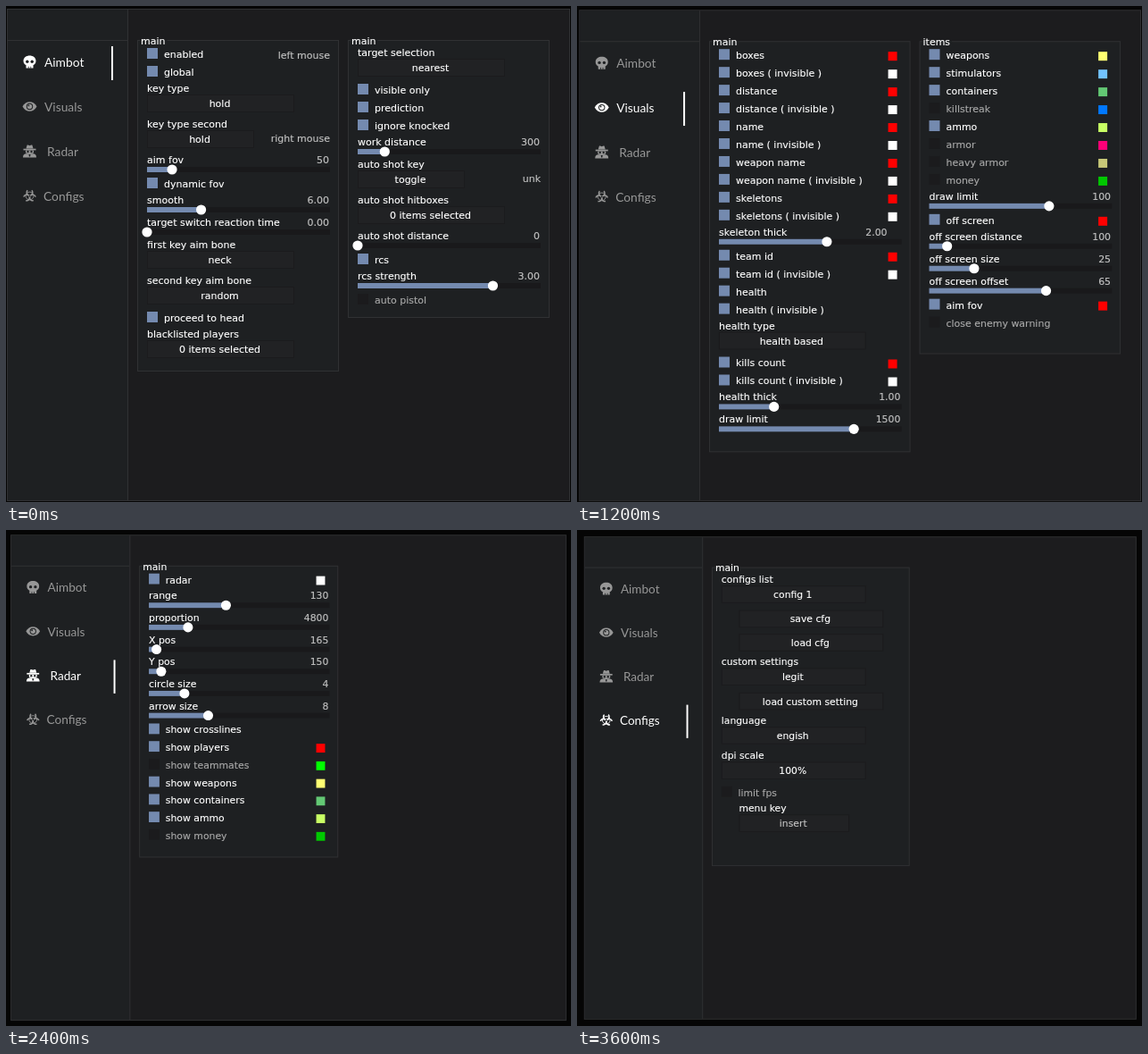
An HTML page with a canvas that plays this animation: 633x555 px, repeating every 4.8 s.

```html
<!DOCTYPE html>
<html lang="en">
<head>
<meta charset="utf-8">
<title>Menu tabs</title>
<style>
html, body { margin: 0; width: 100%; height: 100%; overflow: hidden; background: #000; }
canvas { display: block; }
</style>
</head>
<body>
<canvas id="stage" width="633" height="555"></canvas>
<script>
const ctx = document.getElementById('stage').getContext('2d');
const HOLD = 1200;
const FONT = '11px "DejaVu Sans", Verdana, sans-serif';
const TAB_FONT = '13.8px Lato, "Open Sans", sans-serif';
const C = {
  bg: '#1c1c1e', side: '#1e2022', line: '#303133', track: '#19191b',
  blue: '#748aaf', field: '#212224', edge: '#1b1b1d',
  text: '#fff', dim: '#a8a8a8', value: '#c2c2c2', tab: '#979797'
};
const RED = '#ff0000', WHITE = '#fff', YELLOW = '#ffff72', GREEN = '#63c874',
      LIME = '#c8ff64', MONEY = '#00c800';

// Row builders
const check = (label, swatch, on = true) => ({ type: 'check', label, swatch, on });
const off = (label, swatch) => check(label, swatch, false);
const slider = (label, value, part, right = 204) => ({ type: 'slider', label, value, part, right });
const combo = (label, value, opt = {}) => ({ type: 'combo', label, value, w: 165, indent: 0, ...opt });
const button = label => ({ type: 'button', label });
const keyed = (row, key) => ({ ...row, key });
const pair = (label, color = RED) => [check(label, color), check(label + ' ( invisible )', color && WHITE)];

const ADVANCE = { check: 20, slider: 25, combo: 40, button: 27 };

const pages = [
  {
    scale: 1, x: 0, y: 0,
    groups: [
      { title: 'main', x: 147, bottom: 408, rows: [
        keyed(check('enabled'), 'left mouse'),
        check('global'),
        combo('key type', 'hold'),
        keyed(combo('key type second', 'hold', { w: 120 }), 'right mouse'),
        slider('aim fov', '50', 50 / 360),
        check('dynamic fov'),
        slider('smooth', '6.00', 0.3),
        slider('target switch reaction time', '0.00', 0),
        combo('first key aim bone', 'neck'),
        combo('second key aim bone', 'random'),
        check('proceed to head'),
        combo('blacklisted players', '0 items selected')
      ] },
      { title: 'main', x: 383, bottom: 348, rows: [
        combo('target selection', 'nearest'),
        check('visible only'),
        check('prediction'),
        check('ignore knocked'),
        slider('work distance', '300', 0.15),
        keyed(combo('auto shot key', 'toggle', { w: 120 }), 'unk'),
        combo('auto shot hitboxes', '0 items selected'),
        slider('auto shot distance', '0', 0),
        check('rcs'),
        slider('rcs strength', '3.00', 0.75),
        off('auto pistol')
      ] }
    ]
  },
  {
    scale: 0.998, x: 1.3, y: 1.3,
    groups: [
      { title: 'main', x: 147, bottom: 498, rows: [
        ...['boxes', 'distance', 'name', 'weapon name', 'skeletons'].flatMap(s => pair(s)),
        slider('skeleton thick', '2.00', 0.6, 189),
        ...pair('team id'),
        ...pair('health', null),
        combo('health type', 'health based'),
        ...pair('kills count'),
        slider('health thick', '1.00', 0.306),
        slider('draw limit', '1500', 0.75)
      ] },
      { title: 'items', x: 383, bottom: 388, rows: [
        check('weapons', YELLOW),
        check('stimulators', '#72c3ff'),
        check('containers', GREEN),
        off('killstreak', '#0078ff'),
        check('ammo', LIME),
        off('armor', '#ff0078'),
        off('heavy armor', '#c8c878'),
        off('money', MONEY),
        slider('draw limit', '100', 2 / 3),
        check('off screen', RED),
        slider('off screen distance', '100', 0.1),
        slider('off screen size', '25', 0.25),
        slider('off screen offset', '65', 0.65),
        check('aim fov', RED),
        off('close enemy warning')
      ] }
    ]
  },
  {
    scale: 0.987, x: 4.1, y: 2.3,
    groups: [
      { title: 'main', x: 147, bottom: 368, rows: [
        check('radar', WHITE),
        slider('range', '130', 130 / 300),
        slider('proportion', '4800', 0.22),
        slider('X pos', '165', 165 / 3840),
        slider('Y pos', '150', 150 / 2160),
        slider('circle size', '4', 0.2),
        slider('arrow size', '8', 1 / 3),
        check('show crosslines'),
        check('show players', RED),
        off('show teammates', '#00ff00'),
        check('show weapons', YELLOW),
        check('show containers', GREEN),
        check('show ammo', LIME),
        off('show money', MONEY)
      ] }
    ]
  },
  {
    scale: 0.981, x: 6.8, y: 4.3,
    groups: [
      { title: 'main', x: 147, bottom: 378, rows: [
        combo('configs list', 'config 1'),
        button('save cfg'),
        button('load cfg'),
        combo('custom settings', 'legit'),
        button('load custom setting'),
        combo('language', 'engish'),
        combo('dpi scale', '100%'),
        off('limit fps'),
        combo('menu key', 'insert', { w: 126, indent: 20, color: C.value })
      ] }
    ]
  }
];

function rect(x, y, w, h, color) {
  ctx.fillStyle = color;
  ctx.fillRect(x, y, w, h);
}

// A hairline stroke gives the small type its firmer weight
function text(str, x, mid, color = C.text, align = 'left') {
  ctx.font = FONT;
  ctx.textAlign = align;
  ctx.fillStyle = ctx.strokeStyle = color;
  ctx.lineWidth = 0.15;
  ctx.fillText(str, x, mid + 4);
  ctx.strokeText(str, x, mid + 4);
}

function disc(x, y, r, color) {
  ctx.fillStyle = color;
  ctx.beginPath();
  ctx.arc(x, y, r, 0, Math.PI * 2);
  ctx.fill();
}

function shape(d, color) {
  ctx.fillStyle = color;
  ctx.fill(new Path2D(d));
}

function field(label, x, y, w, color) {
  rect(x, y, w, 20, C.edge);
  rect(x + 1, y + 1, w - 2, 18, C.field);
  text(label, x + w / 2 - 1, y + 10, color, 'center');
}

const draw = {
  check(r, x, y) {
    rect(x, y, 12, 12, r.on ? C.blue : C.edge);
    text(r.label, x + 19, y + 7, r.on ? C.text : C.dim);
    if (r.swatch) rect(x + 190, y + 3, 10, 10, r.swatch);
    if (r.key) text(r.key, x + 205, y + 8, C.value, 'right');
  },
  slider(r, x, y) {
    const len = r.part * 202;
    rect(x, y + 13, 205, 6, C.track);
    rect(x, y + 13, len, 6, C.blue);
    text(r.label, x, y + 5);
    text(r.value, x + r.right, y + 5, C.value, 'right');
    disc(x + len, y + 16, 5.6, WHITE);
  },
  combo(r, x, y) {
    text(r.label, x + r.indent, y + 5);
    field(r.value, x + r.indent, y + 12, r.w, r.color);
    if (r.key) text(r.key, x + 205, y + 21, C.value, 'right');
  },
  button(r, x, y) {
    field(r.label, x + 20, y, 165);
  }
};

// Tab icons, centred on the origin
const icons = {
  skull(color) {
    shape('M-7-1C-7-9 7-9 7-1C7 1.500 5.500 3 4 3.800V7H-4V3.800C-5.500 3-7 1.500-7-1Z', color);
    disc(-2.7, -0.3, 1.7, C.side);
    disc(2.7, -0.3, 1.7, C.side);
    rect(-1.7, 5.2, 0.8, 2, C.side);
    rect(0.9, 5.2, 0.8, 2, C.side);
  },
  eye(color) {
    shape('M-8 0C-4.500-7 4.500-7 8 0C4.500 7-4.500 7-8 0Z', color);
    disc(0, 0, 3.7, C.side);
    disc(0, 0, 2.7, color);
    disc(-1.1, -1.1, 0.9, C.side);
  },
  spy(color) {
    shape('M-4-3L-3-6.500C-2.500-7.500-1-6.200 0-6.200S2.500-7.500 3-6.500L4-3Z', color);
    rect(-7, -2.8, 14, 1.7, color);
    shape('M-4.500-1H4.500V1C4.500 4-4.500 4-4.500 1Z', color);
    shape('M-7.500 7C-7.500 4-6 2.800-4 2.800H4C6 2.800 7.500 4 7.500 7Z', color);
    disc(-2, 0.5, 1.2, C.side);
    disc(2, 0.5, 1.2, C.side);
    shape('M-1 3.500H1L.6 6H-.6Z', C.side);
  },
  hazard(color) {
    ctx.strokeStyle = color;
    for (let i = 0; i < 3; i++) {
      ctx.save();
      ctx.rotate(i * Math.PI * 2 / 3);
      ctx.lineWidth = 1.5;
      ctx.beginPath();
      ctx.arc(0, -3.9, 3.3, -0.8, Math.PI + 0.8);
      ctx.stroke();
      ctx.restore();
    }
    ctx.lineWidth = 0.9;
    ctx.beginPath();
    ctx.arc(0, 0, 4.4, 0, Math.PI * 2);
    ctx.stroke();
    disc(0, 0, 1, C.side);
  }
};

const tabs = [
  { name: 'Aimbot', x: 43, icon: icons.skull },
  { name: 'Visuals', x: 43, icon: icons.eye },
  { name: 'Radar', x: 46, icon: icons.spy },
  { name: 'Configs', x: 42, icon: icons.hazard }
];

function drawWindow(active) {
  rect(1, 3, 631, 551, C.line);
  rect(2, 4, 629, 549, C.bg);
  rect(2, 4, 134, 549, C.side);
  rect(136, 4, 1, 549, C.line);
  rect(2, 38, 134, 1, C.line);
  tabs.forEach((tab, i) => {
    const y = 63 + i * 50;
    const color = i === active ? WHITE : C.tab;
    ctx.save();
    ctx.translate(26.5, y - 0.5);
    tab.icon(color);
    ctx.restore();
    ctx.font = TAB_FONT;
    ctx.textAlign = 'left';
    ctx.fillStyle = color;
    ctx.fillText(tab.name, tab.x, y + 5);
  });
  rect(118, 45 + active * 50, 2, 38, WHITE);
}

function drawGroup({ title, x, bottom, rows }) {
  rect(x, 38, 226, bottom - 37, C.line);
  rect(x + 1, 39, 224, bottom - 39, C.side);
  ctx.font = FONT;
  rect(x + 3, 38, ctx.measureText(title).width + 3, 1, C.side);
  text(title, x + 4, 39);
  let y = 47;
  for (const row of rows) {
    draw[row.type](row, x + 11, y);
    y += ADVANCE[row.type];
  }
}

let shown = -1;
function render(now) {
  const index = Math.floor(now / HOLD) % pages.length;
  if (index !== shown) {
    const page = pages[index];
    ctx.setTransform(1, 0, 0, 1, 0, 0);
    rect(0, 0, 633, 555, '#050505');
    ctx.setTransform(page.scale, 0, 0, page.scale, page.x, page.y);
    drawWindow(index);
    page.groups.forEach(drawGroup);
    shown = index;
  }
}

const start = performance.now();
function tick() {
  render(performance.now() - start);
  requestAnimationFrame(tick);
}
tick();
</script>
</body>
</html>
```
